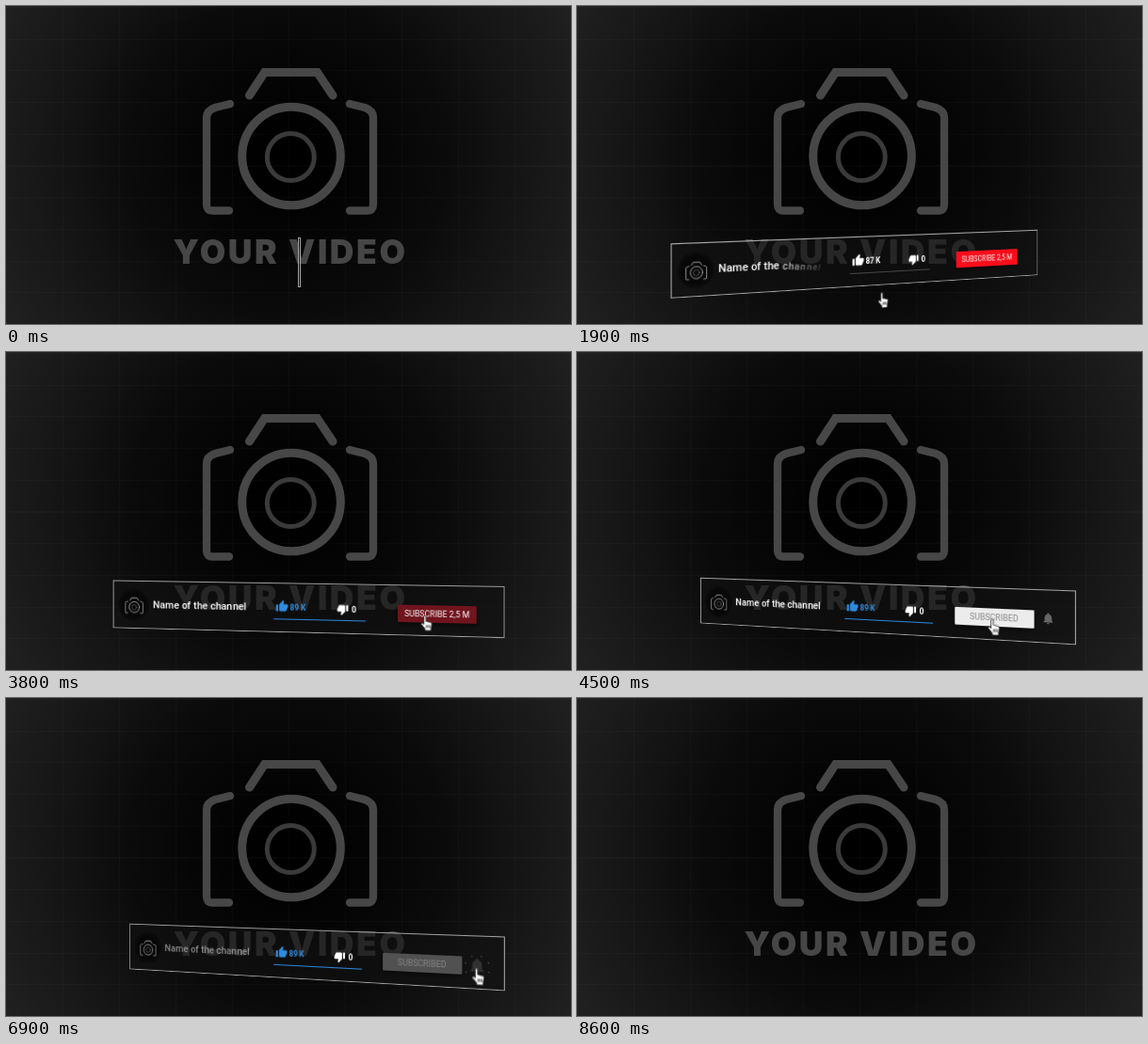
An HTML page for the animation above (10 s loop, 600 px wide and 338 px high).

```html
<!DOCTYPE html>
<html lang="en">
<head>
<meta charset="utf-8">
<title>Channel card overlay</title>
<style>
@property --n { syntax: "<integer>"; inherits: false; initial-value: 0; }

html, body { margin: 0; width: 100%; height: 100%; overflow: hidden; background: #000; }
.stage {
  position: relative; width: 600px; height: 338px; overflow: hidden;
  perspective: 834px; perspective-origin: 300px 169px;
  font-family: Roboto, "Noto Sans", sans-serif; color: #fff;
  background:
    repeating-linear-gradient(90deg, #ffffff05 0 1px, transparent 1px 60px),
    repeating-linear-gradient(#ffffff05 0 1px, transparent 1px 33.7px) 0 1px,
    radial-gradient(circle at 300px 160px, #000 22px, #060606 110px, #0b0b0b 170px, #131313 230px, #1a1a1a 290px, #212121 350px);
}
.stage > svg { position: absolute; inset: 0; }
.title { font: 900 35.5px Inter, "Liberation Sans", sans-serif; letter-spacing: 2.6px; fill: #464646; }
.thick { stroke-width: calc(var(--w, 1) * 9px); }
.mid { stroke-width: calc(var(--w, 1) * 8.3px); }
.thin { stroke-width: calc(var(--w, 1) * 5px); stroke-opacity: .82; }

/* every part runs on the same 10 s clock: 1% = 100 ms */
.card, .card * { animation: 10s linear infinite both; }
.card {
  position: absolute; left: 103px; top: 246.4px; width: 420px; height: 52.8px;
  transform-style: preserve-3d; animation-name: swing;
}
.card > *, .front > * { position: absolute; }
.front { inset: 0; transform: translate3d(1.2px, -.8px, 8px); }
.frame {
  top: 0; bottom: 0; box-sizing: border-box; border: 1.7px solid #a4a4a4;
  background: #11111199; animation-name: open;
}
.avatar {
  left: 6px; top: 8.5px; width: 36px; height: 36px; border-radius: 50%;
  background: radial-gradient(#070707 55%, #0909096b 72%); animation-name: avatar;
}
.avatar svg { --w: .75; position: absolute; left: 6.5px; top: 6.5px; }
.name { left: 46px; top: 19px; font-size: 11.3px; line-height: 16px; font-weight: 500; white-space: pre; animation-name: name; }
.name span { display: inline-block; white-space: pre; animation-name: letter; animation-delay: calc(var(--i) * 50ms); }
.likes { left: 183px; top: 18px; height: 14px; animation-name: likes; }
.likes svg { display: block; fill: currentColor; }
.count { position: absolute; left: 15.5px; top: 1.5px; font-size: 8.4px; line-height: 12px; font-weight: 700; white-space: pre; }
.num { counter-reset: n var(--n); animation-name: count; }
.num::before { content: counter(n); }
.unit { display: inline-block; animation-name: unit; }
.ripple { left: 182px; top: 17px; width: 15px; height: 15px; border-radius: 50%; background: #59708a; animation-name: ripple; }
.dislikes { left: 248px; top: 20.5px; animation-name: dislikes; }
.dislikes svg { display: block; fill: #fff; transform: rotate(180deg); }
.dislikes b { position: absolute; left: 15.4px; top: 0; font-size: 8.6px; line-height: 12px; }
.track, .bar { left: 180.5px; top: 37.6px; width: 97px; height: 1.4px; transform-origin: 0 0; }
.track { background: #454545; animation-name: track; }
.bar { background: #2b86d8; animation-name: bar; }
.button {
  left: 312px; top: 21.3px; width: 80px; height: 18px; border-radius: 1px;
  box-shadow: 0 2px 5px #0009; animation-name: button, paint;
}
.button span { position: absolute; inset: 0; text-align: center; font-size: 8.4px; line-height: 18.5px; white-space: pre; }
.ask { animation-name: ask; }
.done { color: #858585; animation-name: done; }
.bell { left: 384.5px; top: 22px; width: 17px; height: 17px; fill: #8c8c8c; transform-origin: 50% 15%; animation-name: bell; }
.dots { left: 393px; top: 31px; width: 1.2px; height: 1.2px; animation-name: dots; }
.dots i { position: absolute; width: 1.2px; height: 1.2px; background: #999; transform: rotate(calc(var(--i) * 45deg + 20deg)) translateX(12px); }
.hand { left: 206px; top: 26px; width: 12.5px; height: 17px; animation-name: hand; }

@keyframes swing {
  0%, 1.5% { transform: translateY(0) rotateY(0deg); animation-timing-function: ease-in-out; }
  24.5% { transform: translateY(-1.8px) rotateY(25.2deg); }
  33% { transform: translateY(-1.8px) rotateY(24.4deg); animation-timing-function: cubic-bezier(.3,.25,.2,1); }
  45% { transform: translateY(0) rotateY(-20.4deg); }
  54% { transform: translateY(0) rotateY(-21.9deg); }
  67.3% { transform: translateY(0) rotateY(-21.8deg); animation-timing-function: cubic-bezier(.7,0,.3,1); }
  77% { transform: translateY(-1.8px) rotateY(25deg); animation-timing-function: ease-in-out; }
  86%, 100% { transform: translateY(0) rotateY(8deg); }
}
@keyframes open {
  0%, 1% { left: 207.4px; right: 210.2px; opacity: 1; animation-timing-function: cubic-bezier(.33,1,.68,1); }
  16.5%, 77% { left: 0; right: 0; opacity: 1; animation-timing-function: cubic-bezier(.5,0,.6,.8); }
  85.9% { left: 207.4px; right: 210.2px; opacity: 1; }
  86%, 99.99% { left: 207.4px; right: 210.2px; opacity: 0; }
  100% { left: 207.4px; right: 210.2px; opacity: 1; }
}
@keyframes avatar {
  0%, 4% { transform: translateX(60px) scale(0); animation-timing-function: ease-out; }
  10% { transform: translateX(15px); animation-timing-function: ease-out; }
  12% { transform: translateX(7px); animation-timing-function: ease-out; }
  17%, 75% { transform: none; animation-timing-function: ease-in; }
  82%, 100% { transform: translateX(80px) scale(0); }
}
@keyframes name {
  0%, 67% { opacity: 1; }
  69% { opacity: .5; }
  72%, 100% { opacity: 0; }
}
@keyframes letter {
  0%, 9% { opacity: 0; transform: translate(2px, 5px) rotate(15deg) scale(.7); }
  14%, 86% { opacity: 1; transform: none; }
  86.1%, 100% { opacity: 0; transform: translate(2px, 5px) rotate(15deg) scale(.7); }
}
@keyframes likes {
  0%, 8% { opacity: 0; color: #fff; transform: scale(.2); }
  11% { opacity: 1; color: #fff; transform: scale(1.08); }
  14%, 26% { opacity: 1; color: #fff; transform: none; }
  27%, 69.5% { opacity: 1; color: #2f8bdc; transform: none; }
  74%, 100% { opacity: 0; color: #2f8bdc; transform: none; }
}
@keyframes count {
  0%, 10% { --n: 0; }
  12% { --n: 17; animation-timing-function: ease-out; }
  20%, 100% { --n: 89; }
}
@keyframes unit {
  0%, 10.5% { opacity: 0; transform: scale(.3); }
  12% { opacity: .5; transform: scale(.7); }
  15%, 100% { opacity: 1; transform: none; }
}
@keyframes ripple {
  0%, 25% { opacity: 0; transform: scale(0); }
  25.5% { opacity: .7; transform: scale(.3); }
  27% { opacity: .7; transform: scale(.9); }
  30%, 100% { opacity: 0; transform: scale(1.3); }
}
@keyframes dislikes {
  0%, 12.5% { opacity: 0; transform: scale(.3); animation-timing-function: ease-out; }
  16%, 69.5% { opacity: 1; transform: none; }
  74%, 100% { opacity: 0; transform: none; }
}
@keyframes track {
  0%, 14% { opacity: 1; transform: scaleX(0); animation-timing-function: ease-out; }
  20%, 69.5% { opacity: 1; transform: none; }
  71%, 100% { opacity: 0; transform: none; }
}
@keyframes bar {
  0%, 24.5% { transform: scaleX(0); }
  27% { transform: scaleX(.77); animation-timing-function: ease-out; }
  31%, 69.5% { transform: none; animation-timing-function: ease-in; }
  74.5%, 100% { transform: scaleX(0); }
}
@keyframes button {
  0%, 7% { opacity: 1; transform: translate(-2px, -1px) scale(0); animation-timing-function: ease-out; }
  12% { opacity: 1; transform: translate(-2px, -1px) scale(.77, .97); animation-timing-function: ease-out; }
  17%, 41% { opacity: 1; transform: none; animation-timing-function: ease-in-out; }
  46%, 69% { opacity: 1; transform: translateX(-13px); }
  72%, 100% { opacity: 0; transform: translateX(-13px); }
}
@keyframes paint {
  0%, 36.5% { background: #fb0d1b; }
  38% { background: #70141d; }
  39.5% { background: #b01420; }
  42%, 67% { background: #ececec; }
  69%, 100% { background: #505050; }
}
@keyframes ask {
  0%, 14% { opacity: 0; }
  19%, 39.5% { opacity: 1; }
  41%, 100% { opacity: 0; }
}
@keyframes done {
  0%, 40.5% { opacity: 0; }
  43%, 100% { opacity: 1; }
}
@keyframes bell {
  0%, 43% { opacity: 0; transform: scale(0); animation-timing-function: ease-out; }
  47%, 55% { opacity: 1; transform: none; }
  57%, 61% { opacity: 1; transform: rotate(18deg); }
  59%, 63% { opacity: 1; transform: rotate(-18deg); }
  65%, 67% { opacity: 1; transform: none; }
  69% { opacity: .25; transform: scale(.95); }
  72%, 100% { opacity: 0; transform: scale(.6); }
}
@keyframes dots {
  0%, 66.5% { opacity: 0; transform: scale(.2); }
  67.2% { opacity: .8; transform: scale(.5); }
  69% { opacity: .6; transform: none; }
  72%, 100% { opacity: 0; transform: scale(1.3); }
}
@keyframes hand {
  0%, 15% { opacity: 1; transform: translate(45px, 90px); animation-timing-function: ease-out; }
  24.5% { opacity: 1; transform: translate(-20px, -4px); }
  25.7% { opacity: 1; transform: translate(-20px, -4px) scale(.88); }
  27%, 31% { opacity: 1; transform: translate(-20px, -4px); animation-timing-function: ease-in-out; }
  36.5% { opacity: 1; transform: translate(128px, 4.7px); }
  38% { opacity: 1; transform: translate(128px, 4.7px) scale(.95); }
  39.5%, 45% { opacity: 1; transform: translate(128px, 4.7px); animation-timing-function: ease-in-out; }
  52%, 54% { opacity: 1; transform: translate(176px, 5px); }
  55.3% { opacity: 1; transform: translate(176px, 5px) scale(.88); }
  57%, 66% { opacity: 1; transform: translate(176px, 5px); }
  69% { opacity: 1; transform: translate(182px, 5.5px); animation-timing-function: ease-in; }
  74%, 100% { opacity: 0; transform: translate(215px, 2px); }
}
</style>
</head>
<body>
<div class="stage">
  <svg width="600" height="338" viewBox="0 0 600 338">
    <defs>
      <g id="camera" fill="none" stroke-linecap="round">
        <path class="thick" d="M258.5 95 274.5 70.5H330.5L347 95"/>
        <path class="mid" d="M238 104 222 108Q213 111 213 119V211Q213 217.5 219 217.5H237M365 104 381 108Q390 111 390 119V211Q390 217.5 384 217.5H365"/>
        <circle class="thick" cx="303" cy="159.5" r="52.3"/>
        <circle class="thin" cx="302.3" cy="160.6" r="25"/>
      </g>
      <path id="thumb" d="M1 21h4V9H1v12zm22-11c0-1.1-.9-2-2-2h-6.31l.95-4.57.03-.32c0-.41-.17-.79-.44-1.06L14.17 1 7.59 7.59C7.22 7.95 7 8.45 7 9v10c0 1.1.9 2 2 2h9c.83 0 1.54-.5 1.84-1.22l3.02-7.05c.09-.23.14-.47.14-.73v-2z"/>
    </defs>
    <use href="#camera" stroke="#474747"/>
    <text class="title" x="302" y="273.7" text-anchor="middle">YOUR VIDEO</text>
  </svg>

  <div class="card">
    <div class="frame"></div>
    <div class="avatar">
      <svg width="23" height="23" viewBox="200 42 203 203"><use href="#camera" stroke="#bdbdbd"/></svg>
    </div>
    <div class="name">Name of the channel</div>
    <div class="button"><span class="ask">SUBSCRIBE 2,5 M</span><span class="done">SUBSCRIBED</span></div>
    <svg class="bell" viewBox="3 2 18 20.5"><path d="M12 22c1.1 0 2-.9 2-2h-4c0 1.1.89 2 2 2zm6-6v-5c0-3.07-1.64-5.64-4.5-6.32V4c0-.83-.67-1.5-1.5-1.5s-1.5.67-1.5 1.5v.68C7.63 5.36 6 7.92 6 11v5l-2 2v1h16v-1l-2-2z"/></svg>
    <div class="dots"></div>
    <div class="front">
      <div class="likes">
        <svg width="14" height="14" viewBox="0 0 24 24"><use href="#thumb"/></svg>
        <div class="count"><span class="num"></span> <span class="unit">K</span></div>
      </div>
      <div class="ripple"></div>
      <div class="dislikes">
        <svg width="12.5" height="12.5" viewBox="0 0 24 24"><use href="#thumb"/></svg>
        <b>0</b>
      </div>
      <div class="track"></div>
      <div class="bar"></div>
      <svg class="hand" viewBox="0 0 12.5 17">
        <path fill="#fff" stroke="#111" stroke-width=".7" d="M3.5 1.8c0-1.7 2.3-1.7 2.3 0V6.5l4.7 1c1 .3 1.5.9 1.4 1.9L11 13.5V16.5H4.7v-2L.9 10c-.8-1.1.6-2.1 1.5-1.3L3.5 9.8Z"/>
        <path stroke="#111" stroke-width=".8" d="M6.2 10.5v3M7.8 10.5v3M9.4 10.5v3"/>
      </svg>
    </div>
  </div>
</div>
<script>
const addParts = (el, tag, texts) => el.replaceChildren(...texts.map((text, i) => {
  const part = document.createElement(tag);
  part.textContent = text;
  part.style.setProperty("--i", i);
  return part;
}));
const nameEl = document.querySelector(".name");
addParts(nameEl, "span", [...nameEl.textContent]);
addParts(document.querySelector(".dots"), "i", Array(8).fill(""));
</script>
</body>
</html>
```
